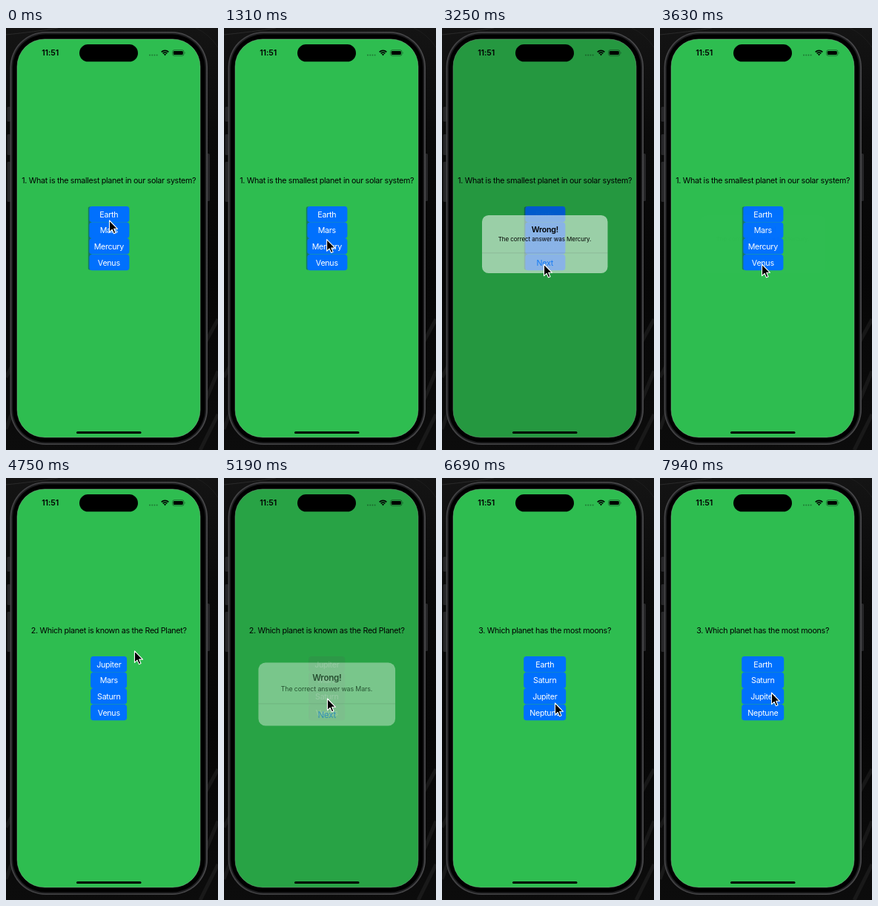
Recreate the animation shown at these times as an HTML page. Size 286 by 568 pixels, loop 8 s.

```html
<!DOCTYPE html>
<html lang="en">
<head>
<meta charset="utf-8">
<title>Planet quiz</title>
<style>
html, body { margin: 0; width: 100%; height: 100%; overflow: hidden; background: #0a0a0a; }
svg { display: block; width: 100vw; height: 100vh; }
text { font-family: Inter, "Liberation Sans", sans-serif; font-size: 10.7px; letter-spacing: -.29px; text-anchor: middle; }
.bold { font-weight: 600; }
.small { font-size: 8.1px; letter-spacing: -.1px; }
</style>
</head>
<body>
<svg viewBox="0 0 286 568">
  <defs>
    <linearGradient id="wall" x1="0" y1="0" x2="0" y2="1">
      <stop offset="0" stop-color="#141414"/>
      <stop offset=".25" stop-color="#0a0a0a"/>
      <stop offset=".6" stop-color="#060606"/>
      <stop offset="1" stop-color="#0c0c0c"/>
    </linearGradient>
    <linearGradient id="rim" x1="0" y1="0" x2="1" y2="0">
      <stop offset="0" stop-color="#434345"/>
      <stop offset=".5" stop-color="#39393b"/>
      <stop offset="1" stop-color="#48484a"/>
    </linearGradient>
  </defs>

  <rect width="286" height="568" fill="url(#wall)"/>
  <g fill="none" stroke="#3a3a3a" stroke-opacity=".6">
    <path d="M0 9Q40 5 70 0"/>
    <path d="M256 0Q274 8 286 26" stroke-opacity=".25"/>
    <path d="M268 425L286 392M270 500L286 462M262 568L286 520M0 470L12 448M0 540L9 515" stroke-width="5" stroke-opacity=".3"/>
  </g>

  <g fill="#262628">
    <rect x="1.5" y="106" width="5" height="20" rx="1.5"/>
    <rect x="1.5" y="143" width="5" height="28" rx="1.5"/>
    <rect x="1.5" y="180" width="5" height="54" rx="1.5"/>
    <rect x="270" y="169" width="5" height="64" rx="1.5"/>
  </g>
  <rect x="5.5" y="5" width="266.5" height="556" rx="48" fill="url(#rim)"/>
  <rect x="7.3" y="6.8" width="262.9" height="552.4" rx="46" fill="#1c1c1e"/>
  <rect x="9" y="8.5" width="259.5" height="549" rx="44.5" fill="#000"/>
  <rect x="15" y="15" width="247" height="536" rx="37" fill="#2ebd50" stroke="#8fb79a" stroke-opacity=".45"/>

  <text id="question" x="138.7" y="208.9"></text>
  <g id="buttons"></g>
  <rect id="dim" x="15" y="15" width="247" height="536" rx="37"/>

  <text class="bold" x="59.7" y="37.3" style="letter-spacing:-.1px">11:51</text>
  <rect x="99" y="22" width="79" height="23.3" rx="11.65"/>
  <g fill-opacity=".35">
    <circle cx="194" cy="36.4" r="1"/><circle cx="197.2" cy="36.4" r="1"/>
    <circle cx="200.4" cy="36.4" r="1"/><circle cx="203.6" cy="36.4" r="1"/>
  </g>
  <g fill="none" stroke="#000" stroke-width="1.7">
    <path d="M209.7 32.3A6.8 6.8 0 0 1 219.3 32.3"/>
    <path d="M211.7 34.3A4 4 0 0 1 217.3 34.3"/>
  </g>
  <path d="M212.9 35.6A2.3 2.3 0 0 1 216.1 35.6L214.5 37.3Z"/>
  <rect x="224.6" y="29.7" width="15.4" height="7.6" rx="2.4" fill="none" stroke="#000" stroke-opacity=".5" stroke-width=".8"/>
  <rect x="225.8" y="30.9" width="13" height="5.2" rx="1.4"/>
  <path d="M241 32.2Q242.4 33.5 241 34.8Z" fill-opacity=".45"/>
  <rect x="95" y="543" width="87.5" height="3" rx="1.5"/>

  <g id="alert">
    <rect x="54" y="252" width="169.5" height="78" rx="8.8" fill="#fff" fill-opacity=".55"/>
    <path d="M54 302.8H223.5" stroke="#3c3c43" stroke-opacity=".25" stroke-width=".6"/>
    <g id="wording">
      <text class="bold" x="138.8" y="274.6">Wrong!</text>
      <text class="small" id="message" x="138.5" y="287.2"></text>
      <text x="138.8" y="320" fill="#147cf5">Next</text>
    </g>
  </g>

  <path id="cursor" d="M.5 0V15.6L4.1 12.3L6.5 17.8L9 16.7L6.7 11.3H11.5Z" stroke="#fff" stroke-width="1.1" stroke-linejoin="round"/>
</svg>
<script>
const LOOP = 8000;
const quiz = [
  { from: 0, ask: "1. What is the smallest planet in our solar system?", x: 112.4, w: 54,
    options: ["Earth", "Mars", "Mercury", "Venus"] },
  { from: 3690, ask: "2. Which planet is known as the Red Planet?", x: 114.1, w: 49,
    options: ["Jupiter", "Mars", "Saturn", "Venus"] },
  { from: 6200, ask: "3. Which planet has the most moons?", x: 110.2, w: 57,
    options: ["Earth", "Saturn", "Jupiter", "Neptune"] }
];
const alerts = [
  { open: 2420, close: 3240, answer: "Mercury" },
  { open: 5088, close: 5755, answer: "Mars" }
];
// time, x, y of the pointer tip
const path = [
  [0, 139, 259], [900, 139, 259], [1800, 137, 318], [4080, 137, 318],
  [4380, 64, 212], [4680, 184, 212], [4900, 139, 297], [5250, 139, 297],
  [5550, 156, 316], [6050, 156, 316], [6450, 152, 303], [7190, 152, 303],
  [7560, 150, 289], [LOOP, 150, 289]
];

const $ = id => document.getElementById(id);
const set = (el, attrs) => { for (const k in attrs) el.setAttribute(k, attrs[k]); };
const add = (parent, tag, attrs) => {
  const el = document.createElementNS("http://www.w3.org/2000/svg", tag);
  set(el, attrs);
  return parent.appendChild(el);
};
const ease = p => p * p * (3 - 2 * p);
const spring = ms => {
  const s = Math.max(0, ms) * 0.018;
  return 1 - (1 + s) * Math.exp(-s);
};

const edge = add($("buttons"), "rect", { x: 110.8, y: 240.5, width: 5, height: 85, rx: 2, fill: "#147a62" });
const rows = [0, 1, 2, 3].map(i => {
  const y = 239.9 + i * 21.6;
  return {
    box: add($("buttons"), "rect", { y, height: 21.5, rx: 3.8 }),
    label: add($("buttons"), "text", { x: 138.8, y: y + 14.9, fill: "#fff" })
  };
});

function pointerAt(t) {
  const i = Math.max(1, path.findIndex(p => p[0] > t));
  const [t0, x0, y0] = path[i - 1], [t1, x1, y1] = path[i];
  const p = ease((t - t0) / (t1 - t0));
  return [x0 + (x1 - x0) * p, y0 + (y1 - y0) * p];
}

function draw(t) {
  const page = quiz.filter(q => q.from <= t).pop();
  const alert = alerts.find(a => t >= a.open && t < a.close + 450);
  const muted = !!alert && t < alert.close;
  let shown = 0, scale = 1;
  if (alert) {
    const p = spring(t - alert.open);
    scale = 1.2 - 0.2 * p;
    shown = Math.min(1, 1.25 * p) * (1 - spring(t - alert.close));
    $("message").textContent = `The correct answer was ${alert.answer}.`;
    set($("wording"), { opacity: Math.min(1, 1.4 * p) });
  }

  $("question").textContent = page.ask;
  set(edge, { opacity: page === quiz[0] && !muted ? 1 : 0 });
  rows.forEach(({ box, label }, i) => {
    set(box, {
      x: page.x, width: page.w,
      fill: muted ? "#55665a" : "#0070fd",
      "fill-opacity": muted ? 0.24 * (1 - 0.6 * shown) : 1
    });
    label.textContent = page.options[i];
    set(label, { opacity: muted ? 0.8 * (1 - shown) : 1 - shown });
  });

  set($("dim"), { "fill-opacity": 0.2 * shown });
  set($("alert"), {
    opacity: shown,
    transform: `translate(138.75 291) scale(${scale}) translate(-138.75 -291)`
  });
  set($("cursor"), { transform: `translate(${pointerAt(t)})` });
}

const start = performance.now();
function tick() {
  draw((performance.now() - start) % LOOP);
  requestAnimationFrame(tick);
}
tick();
</script>
</body>
</html>
```
